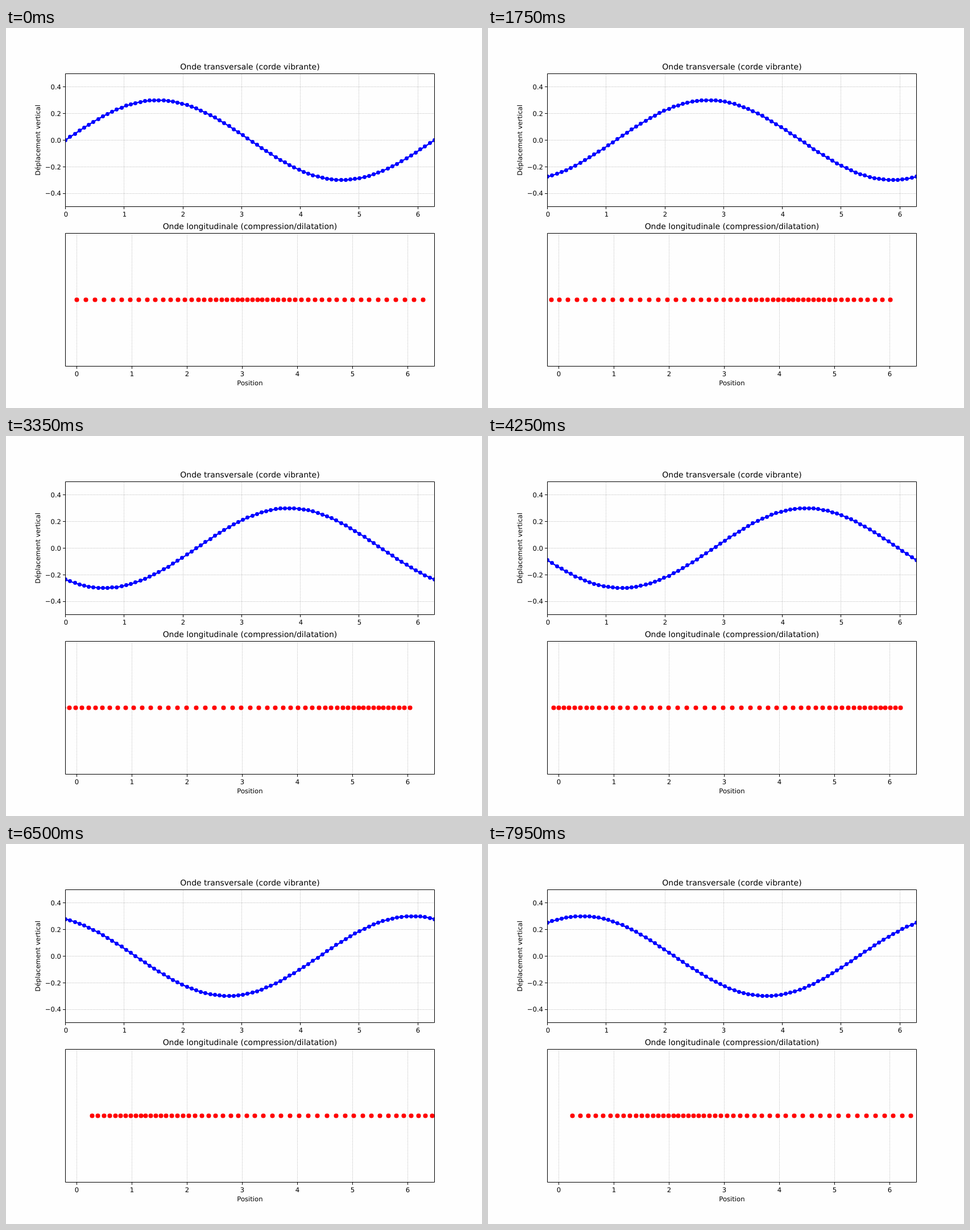
Animation of 837 by 669 pixels, one loop 8 s. Source, as an HTML page:

```html
<!DOCTYPE html>
<html lang="fr">
<head>
<meta charset="utf-8">
<title>Ondes</title>
<style>
  html, body { margin: 0; width: 100%; height: 100%; overflow: hidden; background: #fefefe; }
  svg { display: block; }
  path { fill: none; stroke-linejoin: round; }
  text { font: 11.625px "DejaVu Sans", sans-serif; text-anchor: middle; text-rendering: geometricPrecision; }
  .title { font-size: 13.95px; }
  .end { text-anchor: end; }
  .grid { stroke: #b0b0b0; stroke-width: 1; stroke-dasharray: .93 1.534; }
  .axis { stroke: #000; stroke-width: 1; stroke-linejoin: miter; }
  .blue { stroke: #00f; }
  .red { stroke: #f00; }
  .dots { stroke-linecap: round; }
</style>
</head>
<body>
<svg id="stage" width="837" height="669" viewBox="0 0 837 669">
  <clipPath id="plots"><path d="M105 80H753V314H105ZM105 361H753V595H105Z"/></clipPath>
</svg>
<script>
const TAU = 2 * Math.PI;
const LEFT = 104.625, RIGHT = 753.3, HEIGHT = 234.15;
const STEP_MS = 50, LOOP_MS = 8000, PHASE_STEP = 1 / 30, AMPLITUDE = 0.3;

const stage = document.getElementById('stage');
const snap = v => Math.floor(v) + 0.5; // nearest pixel centre

function add(tag, attributes, content = '') {
  const node = document.createElementNS('http://www.w3.org/2000/svg', tag);
  for (const [name, value] of Object.entries(attributes)) node.setAttribute(name, value);
  node.textContent = content;
  return stage.appendChild(node);
}

const scale = (min, max, from, to) => v => from + (v - min) / (max - min) * (to - from);
const upper = { top: 80.28, x: scale(0, TAU, LEFT, RIGHT), y: scale(-0.5, 0.5, 80.28 + HEIGHT, 80.28) };
const lower = { top: 361.26, x: scale(-0.2, TAU + 0.2, LEFT, RIGHT) };
const xTicks = [0, 1, 2, 3, 4, 5, 6];
const yTicks = [-0.4, -0.2, 0, 0.2, 0.4];

function drawGrid({ top, x, y }) {
  for (const v of xTicks) add('path', { class: 'grid', d: `M${snap(x(v))} ${top + HEIGHT}V${top}` });
  if (y) for (const v of yTicks) add('path', { class: 'grid', d: `M${LEFT} ${snap(y(v))}H${RIGHT}` });
}

function drawAxes({ top, x, y }, title) {
  const bottom = snap(top + HEIGHT), left = snap(LEFT);
  add('path', { class: 'axis', d: `M${left} ${snap(top)}H${snap(RIGHT)}V${bottom}H${left}Z` });
  for (const v of xTicks) {
    add('path', { class: 'axis', d: `M${snap(x(v))} ${bottom}v4.5` });
    add('text', { x: Math.round(x(v)) + 0.5, y: bottom + 17.5 }, v);
  }
  if (y) for (const v of yTicks) {
    add('path', { class: 'axis', d: `M${left} ${snap(y(v))}h-4.5` });
    add('text', { class: 'end', x: 97, y: Math.round(y(v) + 4.4) }, v.toFixed(1).replace('-', '\u2212'));
  }
  add('text', { class: 'title', x: (LEFT + RIGHT) / 2, y: Math.round(top - 6.98) }, title);
}

const addWave = (className, width) =>
  add('path', { class: className, 'stroke-width': width, 'clip-path': 'url(#plots)' });

drawGrid(upper);
drawGrid(lower);
const string = addWave('blue', 2.325);
const beads = addWave('blue dots', 6.975);
const particles = addWave('red dots', 8.14);
drawAxes(upper, 'Onde transversale (corde vibrante)');
drawAxes(lower, 'Onde longitudinale (compression/dilatation)');
add('text', { x: (LEFT + RIGHT) / 2, y: 629 }, 'Position');
add('text', { transform: 'translate(60 197.4) rotate(-90)' }, 'Déplacement vertical');

const samples = count => Array.from({ length: count }, (_, i) => i * TAU / (count - 1));
const stringX = samples(80), particleX = samples(50);
const particleY = lower.top + HEIGHT / 2;

// Zero-length strokes with round caps draw the markers.
const dots = points => points.map(([x, y]) => `M${snap(x)} ${snap(y)}h0`).join('');

function render(now) {
  const phase = Math.floor(now % LOOP_MS / STEP_MS) * PHASE_STEP;
  const wave = x => AMPLITUDE * Math.sin(x - phase);
  const curve = stringX.map(x => [upper.x(x), upper.y(wave(x))]);
  string.setAttribute('d', 'M' + curve.join('L'));
  beads.setAttribute('d', dots(curve));
  particles.setAttribute('d', dots(particleX.map(x => [lower.x(x + wave(x)), particleY])));
  requestAnimationFrame(render);
}
render(0);
</script>
</body>
</html>
```
